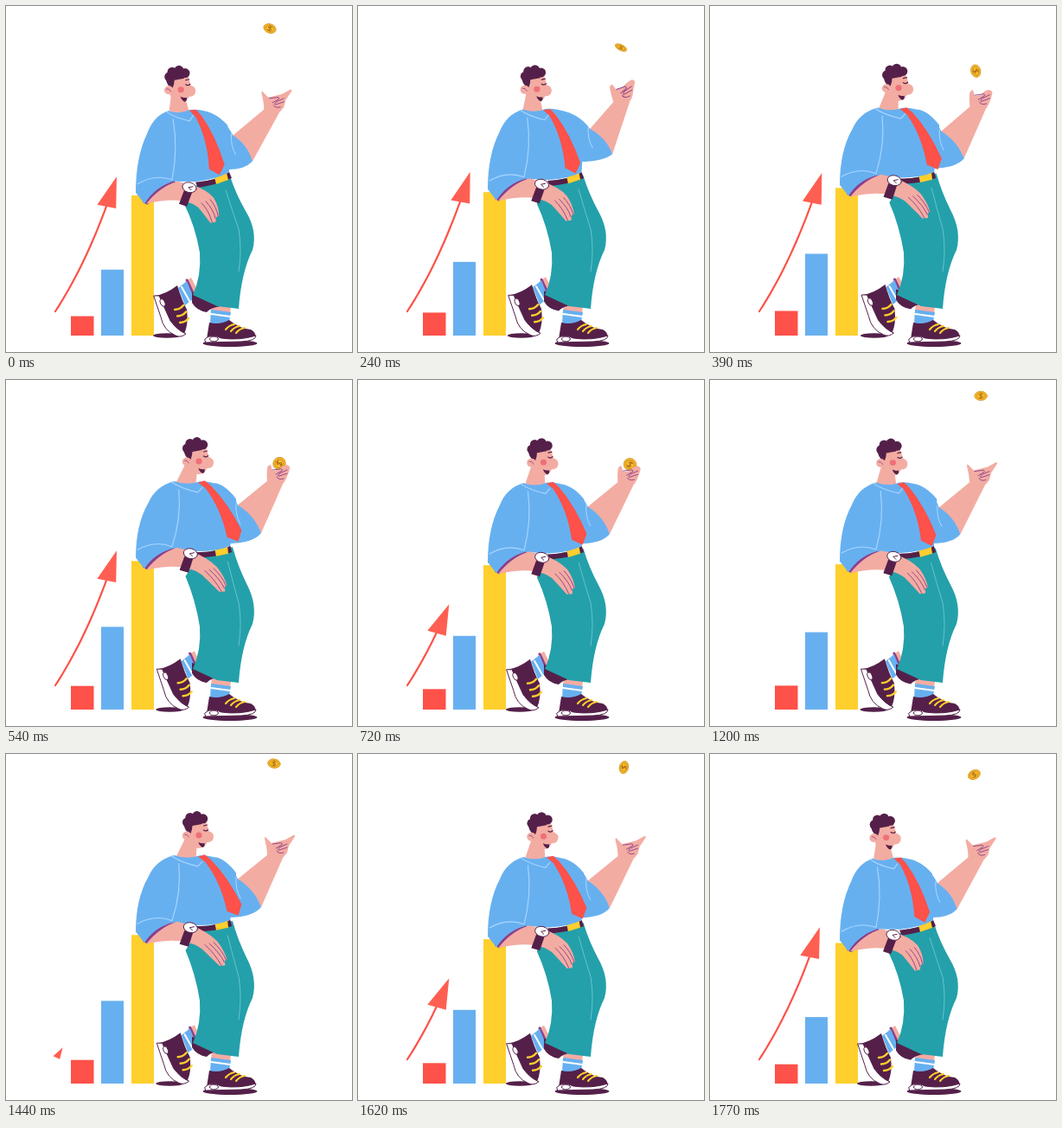
An HTML page with a canvas that plays this animation: 400 px wide and 400 px high, repeating every 1.8 s.

```html
<!DOCTYPE html>
<html lang="en">
<head>
<meta charset="utf-8">
<title>Coin toss</title>
<style>
html, body { margin: 0; width: 100%; height: 100%; overflow: hidden; background: #fff; }
canvas { display: block; width: 400px; height: 400px; }
</style>
</head>
<body>
<canvas id="stage" width="400" height="400"></canvas>
<script>
const ctx = document.getElementById('stage').getContext('2d');
const LOOP = 1800, STEP = 30;
const SKIN = '#f3aca2', BLUE = '#67b0f0', PALE = '#a9d7ff', TEAL = '#24a0aa', YELLOW = '#ffcf2e',
  RED = '#fd5149', DARK = '#54204a', PLUM = '#8b3f8c', WHITE = '#fff', GOLD = '#c98a1b';

const clamp = (v, lo = 0, hi = 1) => Math.min(hi, Math.max(lo, v));
const mix = (a, b, k) => a + (b - a) * k;
const ease = (t, from, to) => (1 - Math.cos(Math.PI * clamp((t - from) / (to - from)))) / 2;
const hump = (t, mid, width) => 1 - ease(Math.abs(t - mid), 0, width);
// Sway: 0 to 1 and back, twice per loop
const wave = (t, delay) => (1 - Math.cos(2 * Math.PI * (t - delay) / 900)) / 2;

// Send every point of a path through a function
const warp = (path, move) => path.replace(/(-?[\d.]+) (-?[\d.]+)/g,
  (_, x, y) => move(+x, +y).map(v => v.toFixed(2)).join(' '));

function blend(a, b, k) {
  const ends = b.match(/-?[\d.]+/g);
  let i = 0;
  return a.replace(/-?[\d.]+/g, n => mix(+n, +ends[i++], k).toFixed(2));
}

function paint(path, fill, line, width = 1) {
  const p = new Path2D(path);
  if (fill) { ctx.fillStyle = fill; ctx.fill(p); }
  if (line) { ctx.strokeStyle = line; ctx.lineWidth = width; ctx.stroke(p); }
}

function oval(x, y, rx, ry, turn, fill, line, width = 1) {
  const p = new Path2D();
  p.ellipse(x, y, rx, ry, turn, 0, 7);
  paint(p, fill, line, width);
}

function at(x, y, draw, turn = 0, sx = 1, sy = sx) {
  ctx.save();
  ctx.translate(x, y);
  ctx.rotate(turn * Math.PI / 180);
  ctx.scale(sx, sy);
  draw();
  ctx.restore();
}

function bars(t) {
  const bar = (x, w, low, rise, delay, color) => {
    const h = low + rise * wave(t, delay);
    ctx.fillStyle = color;
    ctx.fillRect(x, 381 - h, w, h);
  };
  bar(75, 26.5, 22.3, 6.2, -40, RED);
  bar(110, 26, 76, 20.5, 30, BLUE);
  bar(145, 26, 161.8, 10.2, 45, YELLOW);
}

function arrow(t) {
  const gap = Math.abs(t - 270), d = Math.min(gap, LOOP - gap);
  const s = 1 - ease(d, 260, 730) + .028 * Math.cos(Math.PI * Math.min(d, 270) / 540);
  if (s < .012) return;
  const curve = (a, c, b, k) => (1 - k) ** 2 * a + 2 * k * (1 - k) * c + k * k * b;
  const point = k => [curve(57, 97.5, 128, k), curve(353, 291, 197, k)];
  if (s > .15) {
    const line = Array.from({ length: 25 }, (_, i) => point(s * .85 * i / 24).join(' '));
    paint('M' + line.join('L'), null, RED, 2.2);
  }
  const [x, y] = point(s), [bx, by] = point(s - .1);
  const turn = Math.atan2(y - by, x - bx) * 180 / Math.PI;
  at(x, y, () => paint('M0 0L-38 -11L-35 11Z', '#ff5f52'), turn, Math.min(1, s * 3.5));
}

function legs(u, step) {
  oval(186 + 4 * step, 381, 16, 2.8, 0, DARK);
  oval(259, 390, 31.5, 4, 0, DARK);

  at(4.5 * step, -step, () => {
    paint('M207 319L214 314L222 330L216 336Z', SKIN);
    paint('M209 317L216 332', null, PLUM, 3);
    paint('M199 326L209 318L217 338L207 346Z', BLUE);
    paint('M203 325L212 341', null, WHITE, 2);
    paint('M172 335Q185 333 198 323Q203 340 209 351Q211 368 206 379Q193 374 186 362Z', DARK);
    paint('M171 335L177 335Q184 351 190 364Q198 375 208 379Q202 384 196 381Q182 375 179 360Z', WHITE, DARK);
    oval(181, 343, 2.6, 4.5, -.4, WHITE, DARK);
    for (let i = 0; i < 3; i++)
      at(3 * i, 7.5 * i, () => paint('M195 351Q201 351 205 346', null, YELLOW, 2.4));
  });

  paint('M238 344L260 347L259 356L237 354Z', SKIN);
  paint('M237 351L260 354L258 365Q247 370 236 367Z', BLUE);
  paint('M237 356L259 359', null, WHITE, 1.8);
  at(0, -4 * u, () => paint('M215 331L225 334L248 347Q236 349 232 354Q220 352 215 343Z', DARK));
  const hips = (x, y) => {
    const k = u * clamp((260 - y) / 60);
    return [x + 3 * k, y - 4 * k];
  };
  paint(warp('M206 229L222 204L259 197Q266 218 277 237Q291 260 285 282Q272 308 269 350L244 347L216 334Q226 312 224 285Q219 255 206 229Z', hips), TEAL);
  paint(warp('M254 213Q262 238 269 258Q273 282 269 307', hips), null, '#63c4cc');

  paint('M235 366Q247 369 258 363Q270 373 283 374Q290 378 288 383L262 387Q245 383 232 385Z', DARK);
  paint('M230 385Q237 378 249 384Q270 387 289 381Q289 387 272 388L231 389Z', WHITE, DARK);
  oval(240.5, 385, 5, 2.8, 0, WHITE, DARK);
  for (let i = 0; i < 3; i++)
    at(6 * i, 2 * i, () => paint('M254 374Q258 369 264 368', null, YELLOW, 2.2));
}

function torso(u, lag) {
  // The chest leans right while the left elbow is lifted
  const lean = (x, y) => [
    x + u * .14 * Math.max(0, 200 - y) * clamp((x - 150) / 60, 0, 1.2),
    y - u * clamp((260 - x) * .14, 0, 11) * (.4 + .6 * clamp((y - 120) / 100))
  ];
  const neck = (x, y) => [x + lag * (9 + (121 - y) * .4), y - 3 * lag];
  paint(warp('M190 100L206 106L211 122Q200 128 188 121Z', neck), SKIN);
  paint(warp('M219 204Q243 202 258 192L261 199Q243 207 222 210Z', lean), DARK);
  paint(warp('M241 198L255 193L257 201L243 206Z', lean), YELLOW);
  paint(warp('M158 227Q172 206 194 201L198 207Q180 217 163 230Z', lean), PLUM);
  paint(warp('M188 121Q170 127 163 148Q150 175 150 216L160 229Q172 210 193 203L220 203Q245 200 258 192Q258 160 256 138Q238 118 212 120Q200 126 188 121Z', lean), BLUE);
  paint(warp('M193 131Q199 165 192 201Q172 194 152 206M185 122Q194 129 212 133L216 127', lean), null, PALE, 1.1);
}

function tie(lag) {
  at(215 + 11 * lag, 121 - 3 * lag, () =>
    paint('M-4 0L4 -1L10 6Q26 29 36 63L30 75L18 68Q17 34 3 7Z', RED), -10 * lag);
}

function restingArm(u) {
  const lift = (x, y) => [
    x + u * .27 * Math.max(0, y - 207) * clamp((x - 195) / 45),
    y - u * (9.5 - .13 * Math.max(0, x - 212))
  ];
  paint(warp('M162 229Q178 209 198 203L214 207Q232 212 240 222Q246 232 246 243L243 244L242 250L236 251Q228 240 222 233Q205 219 162 229Z', lift), SKIN);
  paint(warp('M226 228Q234 236 238 250M231 226Q240 236 242 246M236 224Q243 232 245 243', lift), null, PLUM, .9);
  paint(warp('M200 229L206 213L215 216L209 232Z', lift), DARK);
  at(212 + 1.4 * u, 210 - 9.5 * u, () => {
    oval(0, 0, 8.2, 5.8, .25, WHITE, DARK);
    paint('M4 -1L-1 0L2 3', null, DARK);
  });
}

function head(lag) {
  at(-1 + 22.5 * lag, -3 * lag, () => {
    paint('M188 88Q190 80 210 82Q212 88 213 92Q219 94 218.5 99Q218 105 211 105Q208 112 201 112Q190 111 188 100Z', SKIN);
    for (let i = 0; i < 4; i++) {
      const a = Math.PI * (1 + .27 * i);
      oval(198 + 10 * Math.cos(a), 82 + 7.5 * Math.sin(a), 5.5, 5.5, 0, DARK);
    }
    paint('M184 82Q184 89 188 93L192 95Q194 90 194 86L205 84L207 78L195 75Z', DARK);
    oval(187.5, 97.5, 5.2, 5, 0, SKIN);
    paint('M185 96Q188 95 190 99', null, PLUM, .8);
    oval(201.5, 97, 3.6, 3.4, 0, '#ef7078');
    paint('M201 105Q205 107 208 106Q209 110 206 111Q202 109 201 105Z', DARK);
    paint('M207 91Q210 93 212 90.5M207 86L211 85', null, DARK, 1.2);
  });
}

// The throwing arm follows the sway, cups under the falling coin, holds it and flicks it up
function tossPose(t, lag) {
  const cup = hump(t, 240, 200), flick = hump(t, 990, 160);
  const pose = (rest, sway, cupped, flicked) => rest + sway * lag + cupped * cup + flicked * flick;
  return {
    cup,
    top: [pose(262, 6, 4.5, 5), pose(150, -5.5, -6.5, -12)],
    low: [pose(284, 11, 7, 15), pose(180, -3, -8, -27)],
    bulge: pose(190, -1, -10, 0),
    end: pose(189, 0, -9, -16),
    x: pose(307, 4, -4, -19),
    y: pose(118, -3, -10, -20),
    turn: pose(0, 0, -12, -38),
    size: pose(1, 0, .05, .2),
    grip: ease(t, 0, 360) - ease(t, 820, 960)
  };
}

function coin(t, arm) {
  const air = t < 840 ? t + LOOP : t;
  const held = ease(t, 300, 540) - ease(t, 800, 930);
  const x = Math.max(304, 316 - 11 * (air - 990) / 810);
  const y = 11 + 15 * (Math.abs(air - 1440) / 360) ** 1.77;
  at(mix(x, arm.x + 5, held), mix(y, arm.y - 18.5, held), () => {
    oval(0, 0, 7.3, 7.3, 0, '#f9bd2d', GOLD, .8);
    oval(0, 0, 5, 5, 0, null, GOLD, .9);
    paint('M2 -3Q-2.5 -3 -2 -1L2 1Q2.5 3 -2 3M0 -4L0 4', null, '#a86a18');
  }, 40 + 1.53 * (air - 990), 1, .72 - .25 * arm.cup + .25 * held);
}

function tossArm(arm, u) {
  const { x, y, top, low, turn, size, grip } = arm;
  const a = turn * Math.PI / 180, cos = size * Math.cos(a), sin = size * Math.sin(a);
  const place = (px, py) => `${x + px * cos - py * sin} ${y + px * sin + py * cos}`;
  paint(`M${top}L${place(-8, 1)}L${place(10, 3)}L${low}Z`, SKIN);
  at(x, y, () => {
    paint(blend('M-9 3Q-9 -6 -12 -17Q-12 -21 -9 -17L-4 -12L4 -14L12 -16L21 -21Q25 -22 22 -18L16 -9L14 -1L10 4Z',
      'M-9 3Q-10 -6 -9 -13Q-8 -17 -5 -17L-3 -10L4 -11L8 -15L13 -17Q18 -16 17 -12L15 -6L13 -1L10 4Z', grip), SKIN);
    paint('M-3 -11L5 -12Q9 -13 8 -10L1 -6M14 -11L5 -7Q2 -3 5 -4L14 -7M2 -3Q4 1 10 -1', null, PLUM, .9);
  }, turn, size);
  const sx = 230 + 12 * u, sy = 122 - 3 * u, [x1, y1] = top, [x2, y2] = low;
  paint(`M${sx} ${sy}Q${(sx + x1) / 2 + 4} ${sy + 4} ${top}Q${(x1 + x2) / 2 + 6} ${(y1 + y2) / 2 - 4} ${low}Q${x2 - 10} ${arm.bulge} ${254 + 3 * u} ${arm.end}Z`, BLUE);
  paint(`M${x1 - 2} ${y1 - 2}Q${x1 - 3} ${y1 + 12} ${x1 + 3} ${y1 + 22}`, null, PALE);
}

const start = performance.now();

function frame() {
  const t = Math.floor((performance.now() - start) % LOOP / STEP) * STEP;
  const u = wave(t, 45), lag = wave(t, 80), arm = tossPose(t, lag);
  ctx.fillStyle = WHITE;
  ctx.fillRect(0, 0, 400, 400);
  ctx.lineCap = ctx.lineJoin = 'round';
  bars(t);
  arrow(t);
  legs(u, wave(t, -40));
  torso(u, lag);
  restingArm(u);
  head(lag);
  coin(t, arm);
  tossArm(arm, u);
  tie(lag);
  requestAnimationFrame(frame);
}
frame();
</script>
</body>
</html>
```
